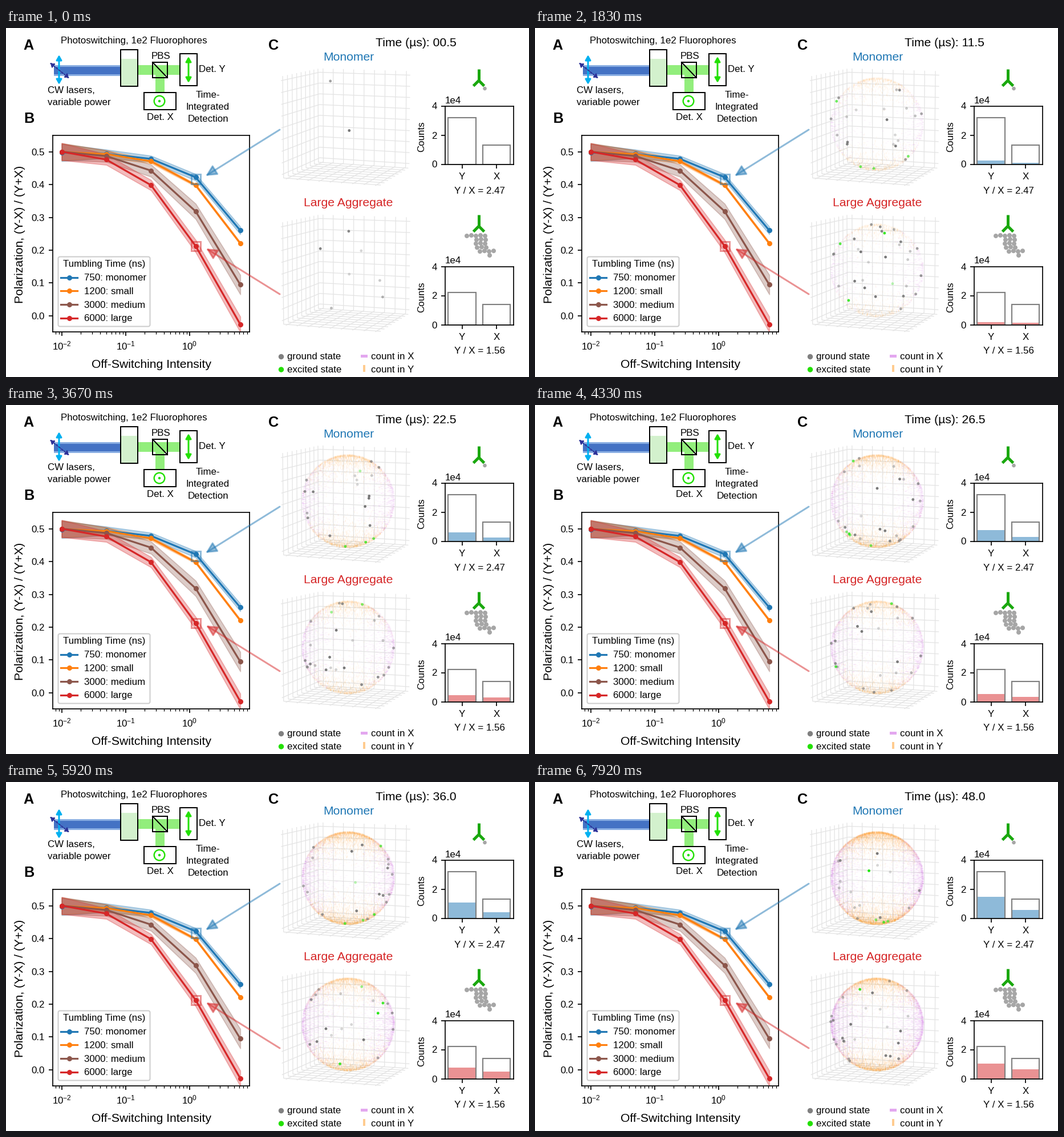
These frames come from a looping animation (917 px wide and 611 px high, 8000 ms). A matplotlib script:

```python
import numpy as np
import matplotlib.pyplot as plt
from matplotlib.animation import FuncAnimation
from matplotlib.collections import LineCollection
from matplotlib.patches import Circle, FancyArrowPatch, FancyBboxPatch, Rectangle

W, H, DPI = 917, 611, 72          # at 72 dpi one point is one pixel
FRAMES, LOOP = 96, 8000
SMALL, MID, BIG = 16.9, 21.1, 25.3
BLUE, ORANGE, BROWN, RED = "#1f77b4", "#ff7f0e", "#8c564b", "#d62728"
GRAY, GREEN, BEAM = "#808080", "#22e000", "#92ee7c"
X_MARK, Y_MARK = "#c850e0", "#ff9a20"

plt.rcParams.update({
    "font.family": "Liberation Sans", "font.size": SMALL,
    "mathtext.fontset": "custom", "mathtext.default": "regular",
    **{f"mathtext.{k}": "Liberation Sans" for k in ("rm", "it", "bf", "cal", "sf", "tt")},
    "axes.linewidth": 1.7,
    **{f"{a}tick.major.{k}": v for a in "xy"
       for k, v in (("size", 7.4), ("width", 1.7), ("pad", 7.0))},
    "xtick.minor.size": 4.2, "xtick.minor.width": 1.3,
})

fig = plt.figure(figsize=(W / DPI, H / DPI), dpi=DPI, facecolor="white")


def box_axes(left, top, width, height):
    return fig.add_axes([left / W, 1 - (top + height) / H, width / W, height / H])


stage = fig.add_axes([0, 0, 1, 1], zorder=3)
stage.set(xlim=(0, W), ylim=(H, 0))
stage.axis("off")


def text(x, y, s, size=SMALL, ha="left", **kw):
    return stage.text(x, y, s, fontsize=size, ha=ha, va="baseline", **kw)


def lines(x, y, s, ha="left", step=21):
    for i, part in enumerate(s.split("\n")):
        text(x, y + step * i, part, ha=ha)


def upright(x, y, s, size=SMALL):
    stage.text(x, y, s, fontsize=size, rotation=90, ha="center", va="center")


def rect(x, y, w, h, fc="none", ec="none", lw=0, z=1, **kw):
    stage.add_patch(Rectangle((x, y), w, h, fc=fc, ec=ec, lw=lw, zorder=z, **kw))


def disc(x, y, r, fc, ec="none", lw=0, z=4):
    stage.add_patch(Circle((x, y), r, fc=fc, ec=ec, lw=lw, zorder=z))


def arrow(a, b, color, lw, style, head, **kw):
    length, width = head
    stage.add_patch(FancyArrowPatch(
        a, b, arrowstyle=f"{style},head_length={length},head_width={width}",
        mutation_scale=1, shrinkA=0, shrinkB=0, color=color, lw=lw, zorder=5, **kw))


# ---- panel A: optical set-up
text(30, 38, "A", BIG, weight="bold")
text(224, 26.5, "Photoswitching, 1e2 Fluorophores", ha="center")
rect(84, 64.5, 116, 19, "#8aaee2")
rect(84, 68, 116, 12.5, "#4472c4")
arrow((93, 47), (93, 99), "#00b0f0", 3, "<|-|>", (7, 4))
arrow((77, 61), (111, 88), "#2b2f96", 1.8, "<|-|>", (6, 3.5), linestyle=(0, (2, 1.3)))
rect(200.5, 54, 30.5, 48, "#d3f1cd")
rect(231, 65, 73, 17, BEAM)
rect(262, 73, 16, 40, BEAM)
rect(200.5, 38, 30.5, 64, ec="black", lw=2, z=3)
rect(257, 60, 26, 27, ec="black", lw=2, z=3)
stage.plot([257, 283], [60, 87], color="black", lw=2, zorder=3)
rect(304.5, 45, 30.5, 56, "white", "black", 2, 3)
rect(242, 113, 55.5, 30, "white", "black", 2, 3)
arrow((320, 50), (320, 96), GREEN, 3, "<|-|>", (7, 4))
disc(269, 128, 9.3, "none", GREEN, 2.4)
disc(269, 128, 2.2, GREEN)
text(271, 53.5, "PBS", ha="center")
text(338, 77, "Det. Y")
text(270, 161, "Det. X", ha="center")
lines(73, 114, "CW lasers,\nvariable power")
lines(354, 121.5, "Time-\nIntegrated\nDetection", "center")

# ---- panel B: polarization curves
text(31, 165.5, "B", BIG, weight="bold")
plot = box_axes(82, 188, 344.5, 344)
step = np.arange(5)
power = 0.01 * 5.0 ** step
FLOOR = -.25


def polarization(x, start, half, slope):
    return FLOOR + (start - FLOOR) / (1 + (x / half) ** slope)


stage.add_patch(FancyBboxPatch((93.5, 402.5), 157, 118, fc="white", ec="#cccccc", lw=2,
                               boxstyle="round,pad=2,rounding_size=3", zorder=2))
text(172, 418, "Tumbling Time (ns)", ha="center")
for i, (label, color, params, spread) in enumerate((
        ("750: monomer", BLUE, (.499, 14.8, .88), .011),
        ("1200: small", ORANGE, (.502, 11.7, .82), .003),
        ("3000: medium", BROWN, (.506, 5.0, .80), .029),
        ("6000: large", RED, (.51, 2.14, .82), .023))):
    mean = polarization(power, *params)
    band = .026 * .4 ** step + spread * step / 4
    plot.fill_between(power, mean - band, mean + band, color=color, alpha=.3, lw=1.7)
    plot.plot(power, mean, "o-", color=color, lw=3.2, ms=8)
    y = 436.5 + 23.7 * i
    stage.plot([96, 125], [y, y], color=color, lw=3.2, zorder=4)
    stage.plot([110.5], [y], "o", color=color, ms=8, zorder=4)
    text(137, y + 5.8, label)
pad = 5 ** .2                     # five percent of the four log steps
plot.set(xscale="log", xlim=(power[0] / pad, power[-1] * pad),
         ylim=(-.0497, .5506), yticks=np.arange(6) / 10)
text(254.5, 595, "Off-Switching Intensity", MID, "center")
upright(24.5, 361, "Polarization, (Y-X) / (Y+X)", MID)
for y, tail, tip, color in ((264, (480, 178), (350, 259), BLUE),
                            (381.5, (480, 466), (351, 386), RED)):
    rect(324.5, y - 8, 16.5, 16.5, ec=color, lw=3, z=5, alpha=.5)
    arrow(tail, tip, color, 3, "-|>", (16, 8), alpha=.5)

# ---- panel C: static labels and icons
text(460, 38, "C", BIG, weight="bold")
clock = text(648.5, 32, "", MID)
text(600.5, 57, "Monomer", MID, "center", color=BLUE)
text(600, 312, "Large Aggregate", MID, "center", color=RED)
disc(482.5, 575.5, 4.7, GRAY)
disc(482.5, 598, 4.7, GREEN)
rect(622, 572, 12, 4.5, "#e3a7ef")
rect(626, 590, 4, 12, "#ffcc8f")
lines(493, 580, "ground state\nexcited state", step=23)
lines(640.5, 580, "count in X\ncount in Y", step=23)


def antibody(y):
    stage.plot([829, 829], [y, y + 21], color="#1aa80e", lw=5, solid_capstyle="butt", zorder=4)
    stage.plot([819.5, 829, 838.5], [y + 29.5, y + 20, y + 29.5], color="#1aa80e", lw=5,
               solid_capstyle="butt", zorder=4)


antibody(72)
disc(839.5, 106, 3.3, "#a6a6a6", z=3)
antibody(327)
for row, (x, n) in enumerate(((808, 5), (825, 3), (824, 3), (826, 3), (831, 4), (848, 1))):
    for j in range(n):
        disc(x + 8 * j, 364 + 6.8 * row - j % 2, 4, "#a6a6a6", z=3)


# ---- panel C: spheres in a perspective box
S, D, EDGE = 80.5, 20.8, 1.09
CX = 599
AZ, EL = np.radians(-70), np.radians(8)


def unit(v):
    return v / np.linalg.norm(v, axis=-1, keepdims=True)


def project(p, cy):
    """World points to stage x, y and depth towards the viewer."""
    x, y, z = np.moveaxis(np.asarray(p, float), -1, 0)
    near = x * np.cos(AZ) + y * np.sin(AZ)
    right = y * np.cos(AZ) - x * np.sin(AZ)
    up = z * np.cos(EL) - near * np.sin(EL)
    depth = near * np.cos(EL) + z * np.sin(EL)
    f = S * D / (D - depth)
    return CX + right * f, cy - up * f, depth


def grid(cy):
    e, rules = EDGE, []
    for t in np.linspace(-1, 1, 9):
        rules += [[(t, -e, -e), (t, e, -e), (t, e, e)],
                  [(e, t, -e), (-e, t, -e), (-e, t, e)],
                  [(-e, -e, t), (-e, e, t), (e, e, t)]]
    paths = [np.column_stack(project(r, cy)[:2]) for r in rules]
    stage.add_collection(LineCollection(paths, colors="#e4e4e4", lw=1.3, zorder=1))


def tumble(rng, n, step, gain, started):
    """Rotational diffusion with on/off switching; directions and excitation per frame."""
    dirs = unit(rng.normal(size=(n, 3)))
    on = np.arange(n) < started
    out = []
    for _ in range(FRAMES):
        lit = rng.random(n) < gain * dirs[:, 2] ** 2
        out.append((dirs[on], lit[on]))
        dirs = unit(dirs + step * rng.normal(size=(n, 3)))
        on = rng.random(n) < np.where(on, .9, .05)
    return out


def detections(rng, n, axis, cy):
    """Stage positions of counts, densest where the dipole lies along the axis."""
    v = unit(rng.normal(size=(n * 6, 3)))
    v = v[rng.random(len(v)) < np.abs(v[:, axis]) ** 3][:n]
    return np.column_stack(project(v, cy)[:2])


class Panel:
    def __init__(self, seed, cy, top, color, total, ratio, rate, marks, sim):
        rng = np.random.default_rng(seed)
        self.cy, self.ratio, self.rate = cy, ratio, rate
        grid(cy)
        self.steps = tumble(rng, *sim)
        self.trails = []
        for n, axis, mark, c in ((marks, 2, "|", Y_MARK),
                                 (int(marks / ratio), 0, "_", X_MARK)):
            line, = stage.plot([], [], mark, color=c, ms=3, mew=1, alpha=.065, zorder=2)
            self.trails.append((line, detections(rng, n, axis, cy)))
        self.dots = stage.scatter([], [], s=23, lw=0, zorder=4)

        ax = box_axes(770, top, 119.5, 102)
        self.bars = ax.bar([0, 1], [0, 0], color=color, alpha=.5, lw=0)
        ax.bar([0, 1], [total, total / ratio], fc="none", ec=GRAY, lw=2.1)
        ax.set(xlim=(-.49, 1.49), ylim=(0, 4), yticks=[0, 2, 4])
        ax.set_xticks([0, 1], ["Y", "X"])
        text(770, top - 5, "1e4")
        text(830, top + 153, f"Y / X = {ratio:.2f}", ha="center")
        upright(729, top + 53.5, "Counts")

    def show(self, k, t):
        elapsed = max(0, t - DELAY)
        count = self.rate * elapsed
        for bar, h in zip(self.bars, (count, count / self.ratio)):
            bar.set_height(h)
        for line, pts in self.trails:
            n = int(len(pts) * elapsed / (T_END - DELAY))
            line.set_data(pts[:n, 0], pts[:n, 1])
        dirs, lit = self.steps[k]
        x, y, depth = project(dirs, self.cy)
        rgba = np.empty((len(x), 4))
        rgba[:, :3] = np.where(lit[:, None], (.13, .9, .05), (.47, .47, .47))
        rgba[:, 3] = np.clip(.65 + .4 * depth, .3, 1)
        self.dots.set_offsets(np.column_stack([x, y]))
        self.dots.set_facecolors(rgba)


DT, DELAY = .5, 3.2               # microseconds per frame, lag before counts build up
T_END = FRAMES * DT
panels = [
    Panel(4, 167.5, 136.5, BLUE, 3.2, 2.47, .0324, 8500, (65, .47, .6, 2)),
    Panel(9, 423.5, 417.5, RED, 2.2, 1.56, .0228, 6200, (76, .167, .45, 7)),
]


def update(k):
    t = (k + 1) * DT
    clock.set_text(f"Time (µs): {t:04.1f}")
    for panel in panels:
        panel.show(k, t)


# the timer counts whole milliseconds
anim = FuncAnimation(fig, update, frames=FRAMES, interval=LOOP // FRAMES,
                     repeat=True, repeat_delay=0, blit=False)
plt.show()
```
